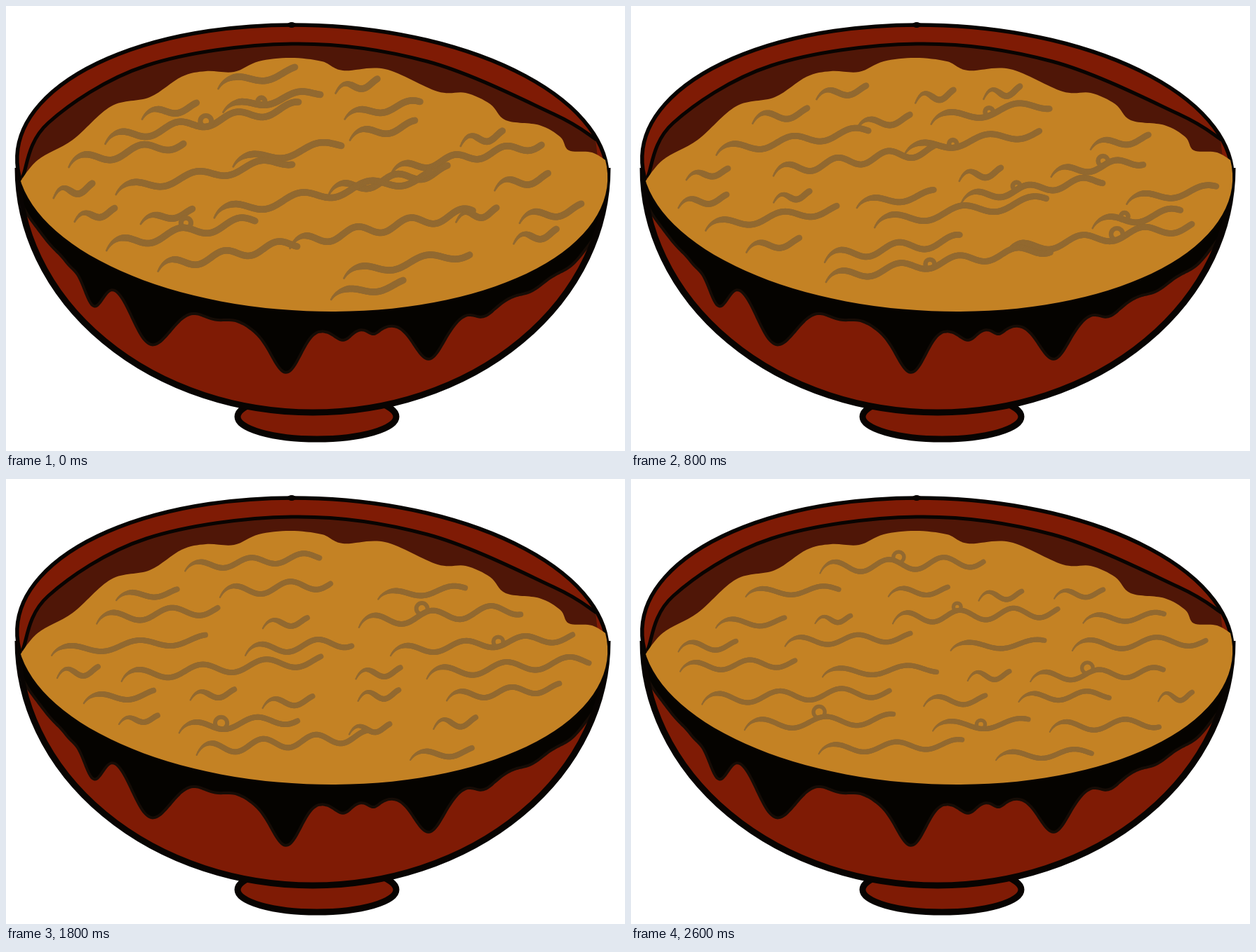
These frames come from a looping animation (882x635 px, 3000 ms). An HTML page with a canvas:

```html
<!DOCTYPE html>
<html lang="en">
<head>
<meta charset="utf-8">
<title>Noodle bowl</title>
<style>
  html, body { margin: 0; width: 100%; height: 100%; overflow: hidden; background: #fff; }
  canvas { display: block; }
</style>
</head>
<body>
<canvas id="stage" width="882" height="635"></canvas>
<script>
const ctx = document.getElementById('stage').getContext('2d');
const INK = '#080402', RED = '#7f1b05', DARK = '#4f1607', SOUP = '#c48224', NOODLE = '#926930';
const LOOP = 3000, STEP = 200, POSES = 14;
const CX = 436.5, CY = 231.5, RX = 421, RY = 204, TILT = .042;

function ellipse(x, y, rx, ry, angle = 0) {
  const path = new Path2D();
  path.ellipse(x, y, rx, ry, angle, 0, 2 * Math.PI);
  return path;
}

// Smooth open path through points
function curve(pts) {
  const path = new Path2D(), at = i => pts[Math.max(0, Math.min(pts.length - 1, i))];
  path.moveTo(...pts[0]);
  for (let i = 0; i < pts.length - 1; i++) {
    const [a, b, c, d] = [at(i - 1), at(i), at(i + 1), at(i + 2)];
    path.bezierCurveTo(b[0] + (c[0] - a[0]) / 6, b[1] + (c[1] - a[1]) / 6,
      c[0] - (d[0] - b[0]) / 6, c[1] - (d[1] - b[1]) / 6, c[0], c[1]);
  }
  return path;
}

// Area under a curve, down to the given level
function below(path, level) {
  const area = new Path2D(path);
  area.lineTo(870, level);
  area.lineTo(10, level);
  area.closePath();
  return area;
}

const rim = ellipse(CX, CY, RX, RY, TILT);
const body = ellipse(437, 231, 420, 349);
const foot = ellipse(443, 586, 113, 32);
const inner = curve([[24, 243], [60, 167], [200, 85], [407, 54], [600, 79], [780, 154], [840, 190]]);
const soup = below(curve([[18, 254], [45, 220], [95, 191], [150, 143], [205, 130], [250, 101], [285, 93],
  [325, 94], [360, 79], [405, 74], [450, 79], [480, 92], [540, 90], [615, 122], [655, 124], [690, 140],
  [712, 163], [760, 170], [790, 187], [802, 206], [835, 209], [860, 224]]), 450);
const sauce = makeSauce();

// Sauce edge: the front rim lowered, with a bell-shaped bump per drip [x, depth, width]
function makeSauce() {
  const drips = [[92, 8, 12], [124, 42, 19], [207, 64, 33], [397, 63, 30],
    [482, 15, 16], [524, 6, 10], [604, 55, 27], [678, 11, 18]];
  const edge = [];
  for (let x = 18; x <= 856; x += 4) {
    const front = CY + TILT * .8 * (x - CX) + RY * Math.sqrt(1 - ((x - CX) / RX) ** 2);
    const drip = drips.reduce((sum, [cx, depth, width]) =>
      sum + depth * Math.exp(-(((x - cx) / width) ** 2)), 0);
    edge.push([x, front + 26 + 2 * Math.sin(x / 9) + drip]);
  }
  return below(curve(edge), 231);
}

function seeded(seed) {
  return () => {
    seed = seed + 0x6D2B79F5 | 0;
    let t = Math.imul(seed ^ seed >>> 15, 1 | seed);
    t = t + Math.imul(t ^ t >>> 7, 61 | t) ^ t;
    return ((t ^ t >>> 14) >>> 0) / 2 ** 32;
  };
}

// True when a point lies on the soup with some room around it
const onSoup = (x, y) => [-17, 17].every(d =>
  ctx.isPointInPath(soup, x + d, y + d) && ctx.isPointInPath(rim, x + d, y + d) &&
  ctx.isPointInPath(soup, x - d, y + d) && ctx.isPointInPath(rim, x - d, y + d));

// Rows of noodles; over the poses they get thinner and lie flatter
function makePose(index) {
  const random = seeded(index * 101 + 7), noodles = [];
  const width = 9.5 - .18 * index, slope = -.17 + .01 * index;
  for (let row = 112 + random() * 14; row < 425; row += 38) {
    for (let x = 36 + random() * 40; x < 820;) {
      const y = row + random() * 16 - 8;
      let length = 50 + 280 * random() ** 1.4;
      while (length > 40 && !onSoup(x + length, y + slope * length)) length -= 8;
      if (length > 40 && onSoup(x, y)) {
        noodles.push({
          x, y, length, slope, width,
          halfWaves: Math.max(2.3, length / (36 + random() * 14)),
          amp: 4 + random() * 2 + length / 120,
          loop: length > 110 && random() < .3 ? .35 + random() * .25 : 0,
          radius: 5 + random() * 4
        });
        x += length + 30 + random() * 45;
      } else {
        x += 12;
      }
    }
  }
  return noodles;
}

function fill(path, color) {
  ctx.fillStyle = color;
  ctx.fill(path);
}

function stroke(path, width, color = INK) {
  ctx.strokeStyle = color;
  ctx.lineWidth = width;
  ctx.stroke(path);
}

function clipped(area, draw) {
  ctx.save();
  ctx.clip(area);
  draw();
  ctx.restore();
}

// A wave with a small hook at its thin left end
function drawNoodle({ x, y, length, slope, width, halfWaves, amp, loop, radius }) {
  const point = u => [x + length * u,
    y + slope * length * u - amp * Math.sin(Math.PI * halfWaves * u) + amp * Math.exp(-u * length / 5)];
  const count = Math.ceil(length / 2);
  for (let i = 0; i < count; i++) {
    const segment = new Path2D();
    segment.moveTo(...point(i / count));
    segment.lineTo(...point((i + 1) / count));
    stroke(segment, width * Math.min(1, .3 + i / 17), NOODLE);
  }
  if (loop) {
    const [cx, cy] = point(loop);
    stroke(ellipse(cx, cy - radius, radius, radius), width * .75, NOODLE);
  }
}

function drawBowl() {
  fill(foot, RED);
  stroke(foot, 9);
  fill(body, RED);
  clipped(body, () => {
    fill(sauce, '#050300');
    stroke(sauce, 4, '#160c06');
  });
  // Only the lower half of the body shows
  const lower = new Path2D();
  lower.rect(0, 231, 882, 404);
  clipped(lower, () => stroke(body, 9));
  ctx.clearRect(0, 0, 882, 231);
  fill(rim, RED);
  clipped(rim, () => fill(below(inner, 450), DARK));
  stroke(inner, 5);
  stroke(rim, 5.5);
  clipped(rim, () => fill(soup, SOUP));
  fill(ellipse(407, 27, 6, 4), INK);
}

const poses = Array.from({ length: POSES }, (_, i) => makePose(i));

function frame(now) {
  const step = Math.floor(now % LOOP / STEP);
  ctx.clearRect(0, 0, 882, 635);
  drawBowl();
  // The last pose is held for two steps
  poses[Math.min(step, POSES - 1)].forEach(drawNoodle);
  requestAnimationFrame(frame);
}

ctx.lineCap = ctx.lineJoin = 'round';
frame(performance.now());
</script>
</body>
</html>
```
